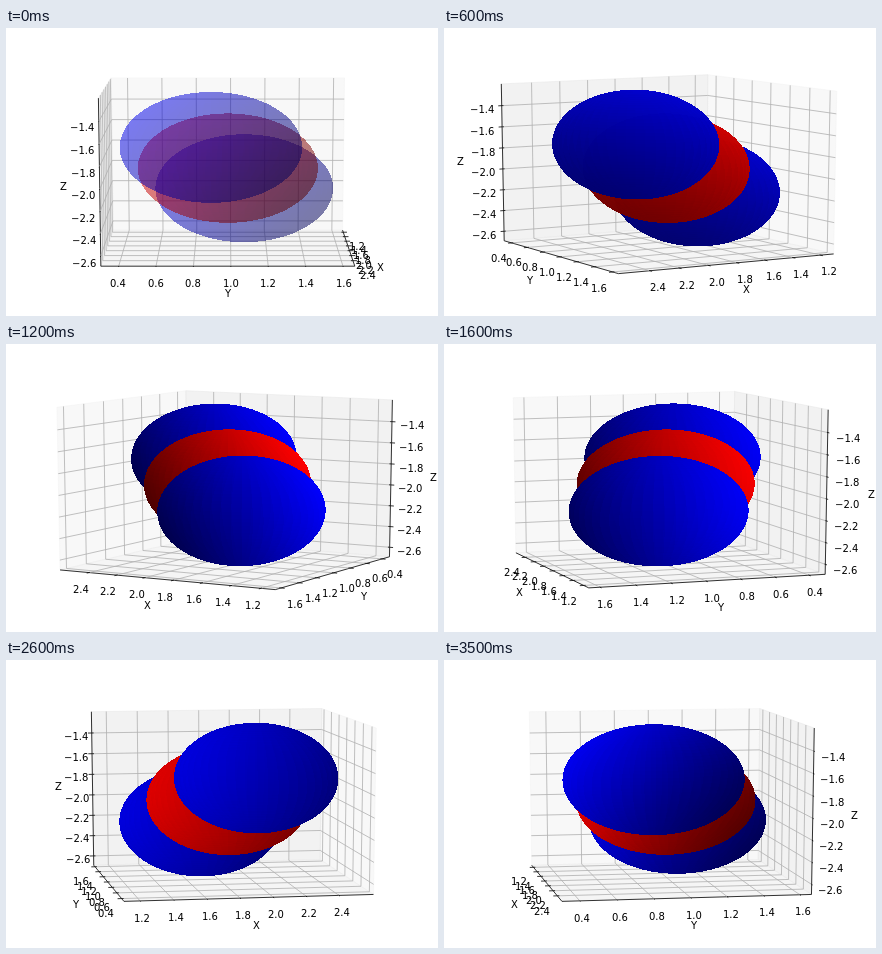
These frames come from a looping animation (432 px wide and 288 px high, 3.6 s). An HTML page with a canvas:

```html
<!DOCTYPE html>
<html lang="en">
<head>
<meta charset="utf-8">
<title>Rotating ellipsoids</title>
<style>
  html, body { margin: 0; width: 100%; height: 100%; overflow: hidden; background: #fff; }
  svg, canvas { position: absolute; left: 0; top: 0; width: 432px; height: 288px; }
  text { font: 10px "DejaVu Sans", sans-serif; fill: #000; }
  .grid { fill: none; stroke: #b0b0b0; stroke-width: .8; }
  .axis { fill: none; stroke: #000; stroke-width: .8; }
</style>
</head>
<body>
<svg id="axes" viewBox="0 0 432 288"></svg>
<canvas id="solids" width="432" height="288"></canvas>
<script>
const W = 432, H = 288, STEPS = 36, STEP_MS = 100;
const DIST = 10, ELEV = 10 * Math.PI / 180;
const SX = W / 0.185, SY = H / 0.185;          // pixels per projected unit
const CX = 0.095 * SX, CY = H - 0.095 * SY;    // screen centre of the cube
const EDGE = 0.5 + 1 / 48;                     // half size of the axes box
const TICK_OUT = 0.2 / 12, TICK_IN = 0.1 / 12;
const TICK_PAD = 11.5 / 180, NAME_PAD = 25 / 180;
const TICK_DROP = 8.2, NAME_DROP = 3.3;        // anchor to text baseline

const AXES = [
  { name: 'X', first: 1.2, mid: 1.858, range: 1.447, pane: 242 },
  { name: 'Y', first: 0.4, mid: 0.984, range: 1.3044, pane: 230 },
  { name: 'Z', first: -2.6, mid: -1.944, range: 1.4368, pane: 236 }
];

// Ellipsoids in cube coordinates; channel is the RGB index that is lit
const RADII = [0.3475, 0.3853, 0.351];
const SHIFT = [0.109, -0.0712, 0.152];
const SOLIDS = [
  { side: 1, channel: 2 },
  { side: 0, channel: 0 },
  { side: -1, channel: 2 }
];
const FACE_ALPHA = 0.3, BANDS = 50;

const svg = document.getElementById('axes');
const ctx = document.getElementById('solids').getContext('2d');
ctx.font = '10px "DejaVu Sans", sans-serif';
const dot = (a, b) => a[0] * b[0] + a[1] * b[1] + a[2] * b[2];

function makeCamera(azim) {
  const c = Math.cos(azim), s = Math.sin(azim);
  const ce = Math.cos(ELEV), se = Math.sin(ELEV);
  return {
    toward: [c * ce, s * ce, se],
    right: [-s, c, 0],
    up: [-c * se, -s * se, ce],
    back: [c < -1e-9 ? EDGE : -EDGE, s < -1e-9 ? EDGE : -EDGE, -EDGE]
  };
}

function project(cam, p) {
  const d = DIST - dot(p, cam.toward);
  return [CX + SX * dot(p, cam.right) / d, CY - SY * dot(p, cam.up) / d];
}

const withValue = (p, i, v) => p.map((old, k) => k === i ? v : old);
const flip = (p, i) => withValue(p, i, -p[i]);

function drawAxes(cam) {
  const { back } = cam;
  const points = list => list.map(p => project(cam, p).map(v => v.toFixed(2)).join()).join(' ');
  const line = (cls, list) => `<polyline class="${cls}" points="${points(list)}"/>`;
  // Text is centred on its anchor, then set on whole pixels
  const text = (p, str, drop) => {
    const [x, y] = project(cam, p);
    const left = Math.round(x - ctx.measureText(str).width / 2);
    return `<text x="${left}" y="${Math.round(y + drop)}">${str}</text>`;
  };
  let out = '';

  AXES.forEach((axis, i) => {
    const a = (i + 1) % 3, b = (i + 2) % 3;
    const tone = `rgba(${axis.pane},${axis.pane},${axis.pane},.5)`;
    const corners = [back, flip(back, a), flip(flip(back, a), b), flip(back, b)];
    out += `<polygon points="${points(corners)}" fill="${tone}" stroke="${tone}"/>`;
  });

  AXES.forEach((axis, i) => {
    const side = i === 0 ? 1 : 0;
    const edge = flip(back, side);
    const sign = Math.sign(edge[side]);
    const outward = (v, pad) => edge.map((e, k) => k === i ? v : e + Math.sign(e) * pad);
    let grid = '', ticks = '';

    for (let n = 0; n < 7; n++) {
      const value = axis.first + n * 0.2;
      const u = (value - axis.mid) / axis.range;
      const corner = withValue(back, i, u);
      const at = withValue(edge, i, u);
      grid += line('grid', [flip(corner, (i + 1) % 3), corner, flip(corner, (i + 2) % 3)]);
      ticks += line('axis', [
        withValue(at, side, at[side] + sign * TICK_OUT),
        withValue(at, side, at[side] - sign * TICK_IN)
      ]);
      ticks += text(outward(u, TICK_PAD), value.toFixed(1).replace('-', '\u2212'), TICK_DROP);
    }
    out += line('axis', [edge, flip(edge, i)]);
    out += text(outward(0, NAME_PAD), axis.name, NAME_DROP) + grid + ticks;
  });
  svg.innerHTML = out;
}

// Brightness of the flat facet that holds unit normal (x, y, z)
function shade(x, y, z) {
  const lonStep = 2 * Math.PI / BANDS, latStep = Math.PI / BANDS;
  const lon = (Math.floor(Math.atan2(y, x) / lonStep) + 0.5) * lonStep;
  const lat = (Math.floor(Math.acos(Math.max(-1, Math.min(1, z))) / latStep) + 0.5) * latStep;
  const r = Math.sin(lat);
  const light = (-2 * r * Math.cos(lon) - 2 * r * Math.sin(lon) + Math.cos(lat)) / 3;
  return 0.65 + 0.35 * light;
}

function drawSolids(cam, step) {
  const image = ctx.createImageData(W, H), px = image.data;
  const through = 1 - FACE_ALPHA;
  // One more translucent copy piles up with each step
  const alpha = 1 - Math.pow(through * through, step + 1);
  const depth = s => s.side * dot(SHIFT, cam.toward);
  const order = [...SOLIDS].sort((a, b) => depth(a) - depth(b));

  for (const { side, channel } of order) {
    const centre = SHIFT.map(v => v * side);
    const [mx, my] = project(cam, centre);
    const eye = cam.toward.map((v, k) => (v * DIST - centre[k]) / RADII[k]);
    const c = dot(eye, eye) - 1;
    const ray = [0, 0, 0];

    for (let y = Math.floor(my - 64); y < my + 64; y++) {
      for (let x = Math.floor(mx - 100); x < mx + 100; x++) {
        const h = (x + 0.5 - CX) / SX, v = (CY - y - 0.5) / SY;
        for (let k = 0; k < 3; k++) {
          ray[k] = (h * cam.right[k] + v * cam.up[k] - cam.toward[k]) / RADII[k];
        }
        const a = dot(ray, ray), b = dot(eye, ray), disc = b * b - a * c;
        if (disc < 0) continue;

        const root = Math.sqrt(disc);
        const lit = t => shade(eye[0] + t * ray[0], eye[1] + t * ray[1], eye[2] + t * ray[2]);
        const near = lit((-b - root) / a), far = lit((-b + root) / a);
        const tone = 255 * (near + through * far) / (1 + through);

        const o = (y * W + x) * 4, under = px[o + 3] / 255 * (1 - alpha);
        const total = alpha + under;
        for (let k = 0; k < 3; k++) {
          px[o + k] = ((k === channel ? tone * alpha : 0) + px[o + k] * under) / total;
        }
        px[o + 3] = total * 255;
      }
    }
  }
  ctx.putImageData(image, 0, 0);
}

const start = performance.now();
let shown = -1;

function tick() {
  const step = Math.floor((performance.now() - start) / STEP_MS) % STEPS;
  if (step !== shown) {
    shown = step;
    const cam = makeCamera(step * 2 * Math.PI / STEPS);
    drawAxes(cam);
    drawSolids(cam, step);
  }
  requestAnimationFrame(tick);
}
tick();
</script>
</body>
</html>
```
